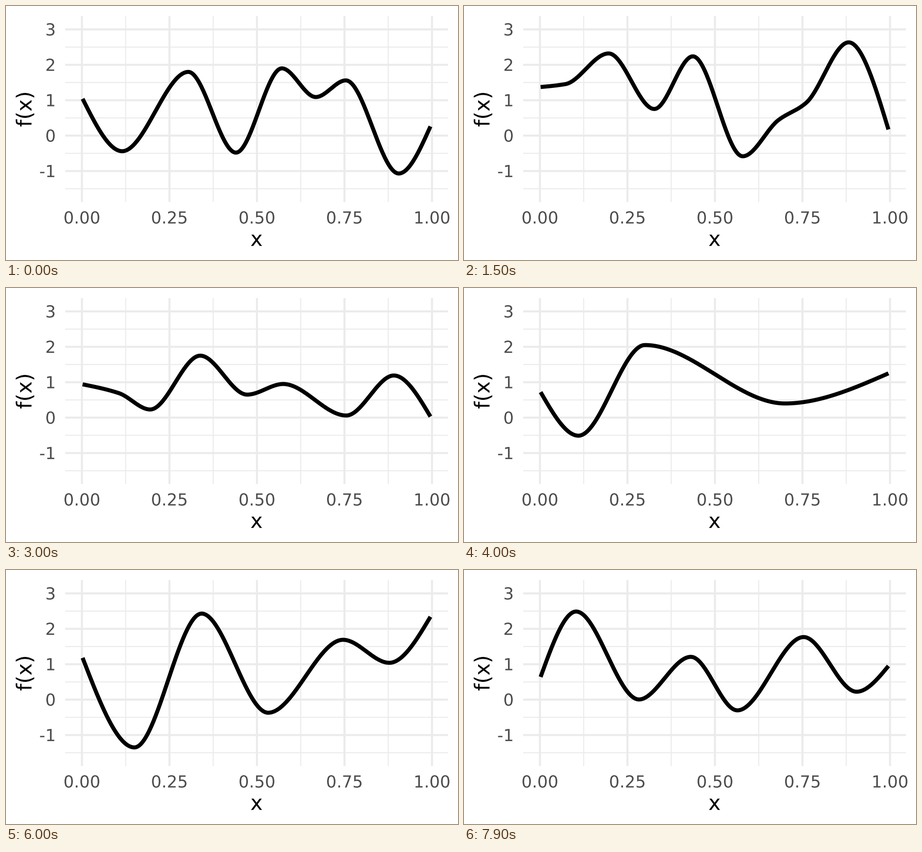
A matplotlib script for the animation above (8000 ms loop, 998x561 px).

```python
import numpy as np
import matplotlib.pyplot as plt
from matplotlib.animation import FuncAnimation
from matplotlib.patches import PathPatch
from matplotlib.textpath import TextPath
from matplotlib.transforms import Affine2D

WIDTH, HEIGHT, DPI = 998, 561, 64
FRAMES, INTERVAL, CYCLE = 80, 100, 10
LEFT, RIGHT, TOP, BOTTOM = 130.6, 975.8, 22.3, 433
GRID, TICK_COLOR = "#EBEBEB", "#4D4D4D"
TICK_SIZE, TITLE_SIZE = 36.67, 45.83
CAP_HEIGHT = 0.729
ADVANCE = {"-": 0.361, ".": 0.318, "f": 0.352, "(": 0.39, ")": 0.39, "x": 0.592}
DIGIT_ADVANCE = 0.636

plt.rcParams["font.family"] = "DejaVu Sans"
xs = np.linspace(0.002, 0.9955, 320)


def x_pixel(value):
    return 167.6 + 773 * value


def y_pixel(value):
    return 286.3 - 78.2 * value


def wave(start, end, *turns):
    """Smooth curve that is level at each turn and straightens at both ends."""
    kx, ky = np.array([(xs[0], start), *turns, (xs[-1], end)]).T
    h = np.diff(kx)
    secant = np.diff(ky) / h
    before, after = secant[:-1], secant[1:]
    slope = np.zeros_like(kx)
    slope[1:-1] = np.where(before * after > 0,
                           2 * before * after / (before + after), 0)
    slope[0] = (3 * secant[0] - slope[1]) / 2
    slope[-1] = (3 * secant[-1] - slope[-2]) / 2

    j = np.clip(np.searchsorted(kx, xs) - 1, 0, len(h) - 1)
    u = (xs - kx[j]) / h[j]
    rise = u * u * (3 - 2 * u)
    bend = slope[j] * u * (1 - u)**2 - slope[j + 1] * u * u * (1 - u)
    return ky[j] + (ky[j + 1] - ky[j]) * rise + h[j] * bend


def ease(t):
    return 4 * t**3 if t < 0.5 else 1 - 4 * (1 - t)**3


waves = [
    wave(1.04, 0.26, (0.115, -0.44), (0.304, 1.80), (0.440, -0.48), (0.571, 1.90),
         (0.668, 1.09), (0.754, 1.56), (0.905, -1.07)),
    wave(1.39, 0.16, (0.073, 1.45), (0.197, 2.34), (0.327, 0.75), (0.437, 2.26),
         (0.579, -0.60), (0.681, 0.45), (0.761, 0.95), (0.882, 2.66)),
    wave(0.46, 0.91, (0.12, 2.08), (0.27, 0.59), (0.39, 1.23), (0.72, -0.30),
         (0.88, 1.26)),
    wave(0.94, 0.03, (0.106, 0.69), (0.195, 0.23), (0.338, 1.75), (0.472, 0.65),
         (0.575, 0.95), (0.755, 0.06), (0.891, 1.19)),
    wave(0.72, 1.25, (0.11, -0.51), (0.30, 2.05), (0.70, 0.40)),
    wave(2.02, 1.34, (0.129, 0.80), (0.232, 1.05), (0.486, 0.13), (0.674, 1.54),
         (0.795, 0.98), (0.955, 1.35)),
    wave(1.18, 2.34, (0.150, -1.35), (0.342, 2.43), (0.532, -0.37), (0.746, 1.69),
         (0.878, 1.04)),
    wave(2.27, 0.43, (0.178, -0.31), (0.332, 2.47), (0.453, 0.41), (0.566, 1.65),
         (0.688, 0.83), (0.860, 1.66)),
    wave(0.61, 0.96, (0.104, 2.53), (0.284, -0.03), (0.432, 1.22), (0.564, -0.34),
         (0.753, 1.78), (0.904, 0.20)),
]

fig = plt.figure(figsize=(WIDTH / DPI, HEIGHT / DPI), dpi=DPI, facecolor="white")
ax = fig.add_axes([0, 0, 1, 1])
ax.set_xlim(0, WIDTH)
ax.set_ylim(HEIGHT, 0)
ax.axis("off")


def draw_line(x, y, width, color):
    return ax.plot(x, y, color=color, lw=width * 72 / DPI, solid_capstyle="butt",
                   solid_joinstyle="round", snap=False)[0]


def label(x, y, text, size, color, align=0.5, angle=0):
    """Set text on its baseline; align is the share of its width before (x, y)."""
    width = size * sum(ADVANCE.get(c, DIGIT_ADVANCE) for c in text)
    place = Affine2D().scale(1, -1).rotate_deg(-angle).translate(x, y)
    glyphs = TextPath((-align * width, 0), text, size=size)
    ax.add_patch(PathPatch(glyphs, facecolor=color, lw=0, snap=False,
                           transform=place + ax.transData))


def grid_x(value, width):
    draw_line([x_pixel(value)] * 2, [TOP, BOTTOM], width, GRID)


def grid_y(value, width):
    draw_line([LEFT, RIGHT], [y_pixel(value)] * 2, width, GRID)


for value in np.arange(0.125, 1, 0.25):
    grid_x(value, 2.22)
for value in np.arange(-1.5, 3, 1):
    grid_y(value, 2.22)
for value in np.arange(0, 1.1, 0.25):
    grid_x(value, 4.44)
    label(x_pixel(value), 480.4, f"{value:.2f}", TICK_SIZE, TICK_COLOR)
for value in range(-1, 4):
    grid_y(value, 4.44)
    label(110, y_pixel(value) + CAP_HEIGHT * TICK_SIZE / 2, str(value),
          TICK_SIZE, TICK_COLOR, align=1)

label((LEFT + RIGHT) / 2, 530, "x", TITLE_SIZE, "black")
label(56.3, (TOP + BOTTOM) / 2, "f(x)", TITLE_SIZE, "black", angle=90)

curve = draw_line(x_pixel(xs), y_pixel(waves[0]), 8.89, "black")


def update(frame):
    index, phase = divmod(frame, CYCLE)
    hold = 3 if index == 0 else 4
    amount = ease(max(0, phase - hold) / (CYCLE - hold))
    values = (1 - amount) * waves[index] + amount * waves[index + 1]
    curve.set_ydata(y_pixel(values))
    return [curve]


anim = FuncAnimation(fig, update, frames=FRAMES, interval=INTERVAL,
                     repeat=True, repeat_delay=0, blit=False)
plt.show()
```
